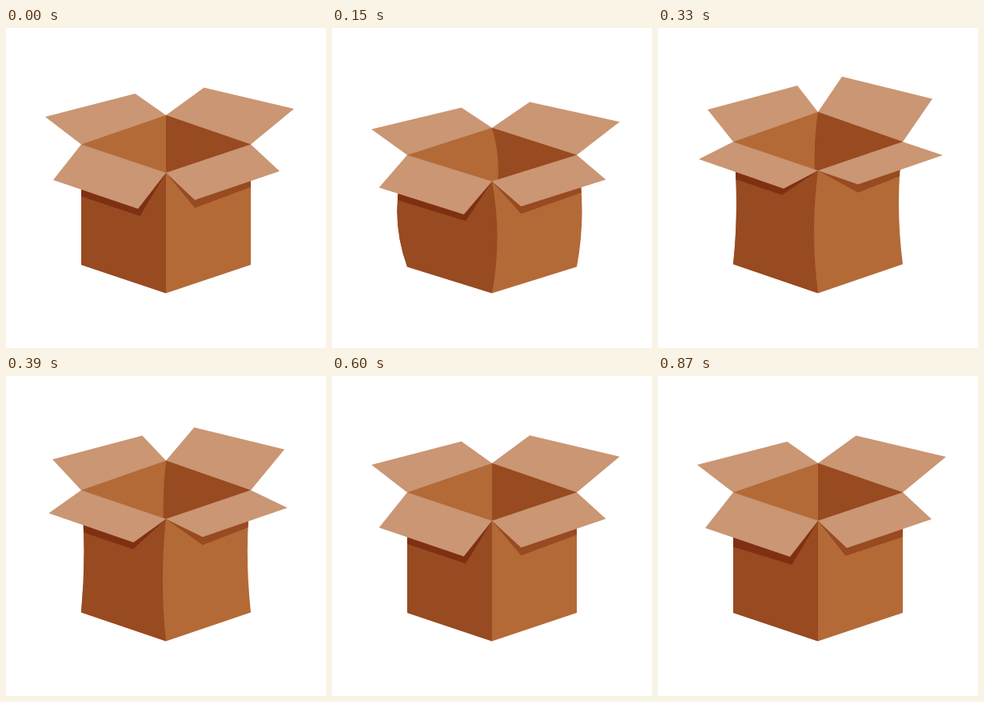
Write an HTML page with a canvas that moves like this. It is 400x400 px and loops after 2.9 s.

```html
<!DOCTYPE html>
<html lang="en">
<head>
<meta charset="utf-8">
<title>Cardboard box</title>
<style>
  html, body { margin: 0; width: 100%; height: 100%; overflow: hidden; background: #fff; }
  canvas { display: block; width: 400px; height: 400px; }
</style>
</head>
<body>
<canvas id="stage"></canvas>
<script>
const LOOP = 2900, STEP = 30, FLOOR = 331.5;
const FLAP = '#ca9673', LIGHT = '#b36a37', DARK = '#984a21', DEEP = '#7f3013';

// time, height scale, flap lift, bulge of the left, right and inner edges
const KEYS = [
  [0, 1, 0, 0, 0, 0],
  [60, 0.946, 0, -10, 5.3, 5.3],
  [130, 0.927, 0, -13, 6.8, 8],
  [240, 0.964, 0.42, -6, 1.8, 5],
  [330, 1.018, 1, 4, -5, -4.3],
  [450, 1.009, 0.3, 2.6, -2.5, -2],
  [540, 1, 0.08, 0, 0, 0],
  [600, 1, 0.025, 0, 0, 0],
  [870, 1, 0, 0, 0, 0]
];

const L = [94, 145.5], C = [200, 181], R = [306, 145.5], K = [200, 109];
const BL = [94, 296], B = [200, FLOOR], BR = [306, 296], INNER = [200, 222];

const canvas = document.getElementById('stage');
const ctx = canvas.getContext('2d');
const dpr = window.devicePixelRatio || 1;
canvas.width = canvas.height = 400 * dpr;

const slope = (i, c) => (KEYS[i + 1][c] - KEYS[i][c]) / (KEYS[i + 1][0] - KEYS[i][0]);

// Monotone tangent: flat at turning points, so poses never overshoot
function tangent(i, c) {
  if (i === 0) return slope(0, c);
  if (i === KEYS.length - 1) return 0;
  const a = slope(i - 1, c), b = slope(i, c);
  return a * b > 0 ? 2 * a * b / (a + b) : 0;
}

function value(t, c) {
  const last = KEYS.length - 1;
  if (t >= KEYS[last][0]) return KEYS[last][c];
  let i = 0;
  while (t >= KEYS[i + 1][0]) i++;
  const span = KEYS[i + 1][0] - KEYS[i][0];
  const u = (t - KEYS[i][0]) / span, v = 1 - u;
  return v * v * (1 + 2 * u) * KEYS[i][c] + u * u * (3 - 2 * u) * KEYS[i + 1][c]
    + span * u * v * (v * tangent(i, c) - u * tangent(i + 1, c));
}

// A point is [x, y]; a bowed edge end is [x, y, cx, cy]
function trace(points) {
  ctx.beginPath();
  points.forEach(([x, y, cx, cy], i) => {
    if (i === 0) ctx.moveTo(x, y);
    else if (cx === undefined) ctx.lineTo(x, y);
    else ctx.quadraticCurveTo(cx, cy, x, y);
  });
  ctx.closePath();
}

function fill(color, points) {
  trace(points);
  ctx.fillStyle = color;
  ctx.fill();
}

function fillInside(color, points, mask) {
  ctx.save();
  trace(mask);
  ctx.clip();
  fill(color, points);
  ctx.restore();
}

const bow = (from, to, bulge) =>
  [to[0], to[1], (from[0] + to[0]) / 2 + 2 * bulge, (from[1] + to[1]) / 2];

const lift = (x, y, dx, dy, q) => [x + dx * q, y + dy * q];

// Shadow under a front flap, its lower edge run on past the side of the box
function shadow(color, corner, end, tip, face) {
  const out = [end[0] + (end[0] - tip[0]) * 0.4, end[1] + (end[1] - tip[1]) * 0.4];
  fillInside(color, [corner, [out[0], corner[1]], out, tip, C], face);
}

function draw(t) {
  const [s, q, left, right, back] = [1, 2, 3, 4, 5].map(c => value(t, c));
  const drift = Math.min(1, Math.max(0, (t - 600) / 270));

  ctx.setTransform(dpr, 0, 0, dpr, 0, 0);
  ctx.fillStyle = '#fff';
  ctx.fillRect(0, 0, 400, 400);
  ctx.transform(1, 0, 0, s, 0, FLOOR * (1 - s));

  // body
  const body = [L, C, R, bow(R, BR, right), B, BL, bow(BL, L, left)];
  const leftFace = [L, C, bow(C, B, right), BL, bow(BL, L, left)];
  const rightFace = [C, R, bow(R, BR, right), B, bow(B, C, right)];
  fill(LIGHT, body);
  fill(DARK, leftFace);

  // back flaps, tucked slightly behind the opening
  fill(FLAP, [[200, 110], lift(200, 109, 0, 0, q), lift(161.5, 82, 12.7, -5.3, q),
    lift(49, 111, 13, -5, q), L, [95, 146]]);
  fill(FLAP, [[200, 110], K, lift(247.5, 74.5, -17.5, -9, q),
    lift(360, 101, -17, -8.2, q), R, [305, 146]]);

  // opening
  const opening = [L, K, R, C];
  fill(LIGHT, opening);
  fillInside(DARK, [K, bow(K, INNER, back), [320, 222], [320, 109]], opening);

  // shadows
  shadow(DEEP, L, [94, 210.5 - 20 * q + 3 * drift],
    [167.5 - 12.5 * q, 235 - 24 * q + drift], leftFace);
  shadow(DARK, R, [306, 198.7 - 12.4 * q + 2.3 * drift],
    [236 + 14 * q - 1.5 * drift, 225 - 17 * q], rightFace);

  // front flaps
  fill(FLAP, [L, lift(59, 190, -8, -23, q), lift(165, 226, -8, -23, q), C]);
  fill(FLAP, [R, lift(342, 179, 14, -17, q), lift(236, 215, 14, -17, q), C]);
}

const start = performance.now();
function tick() {
  const t = (performance.now() - start) % LOOP;
  draw(Math.floor(t / STEP) * STEP);
  requestAnimationFrame(tick);
}
tick();
</script>
</body>
</html>
```
